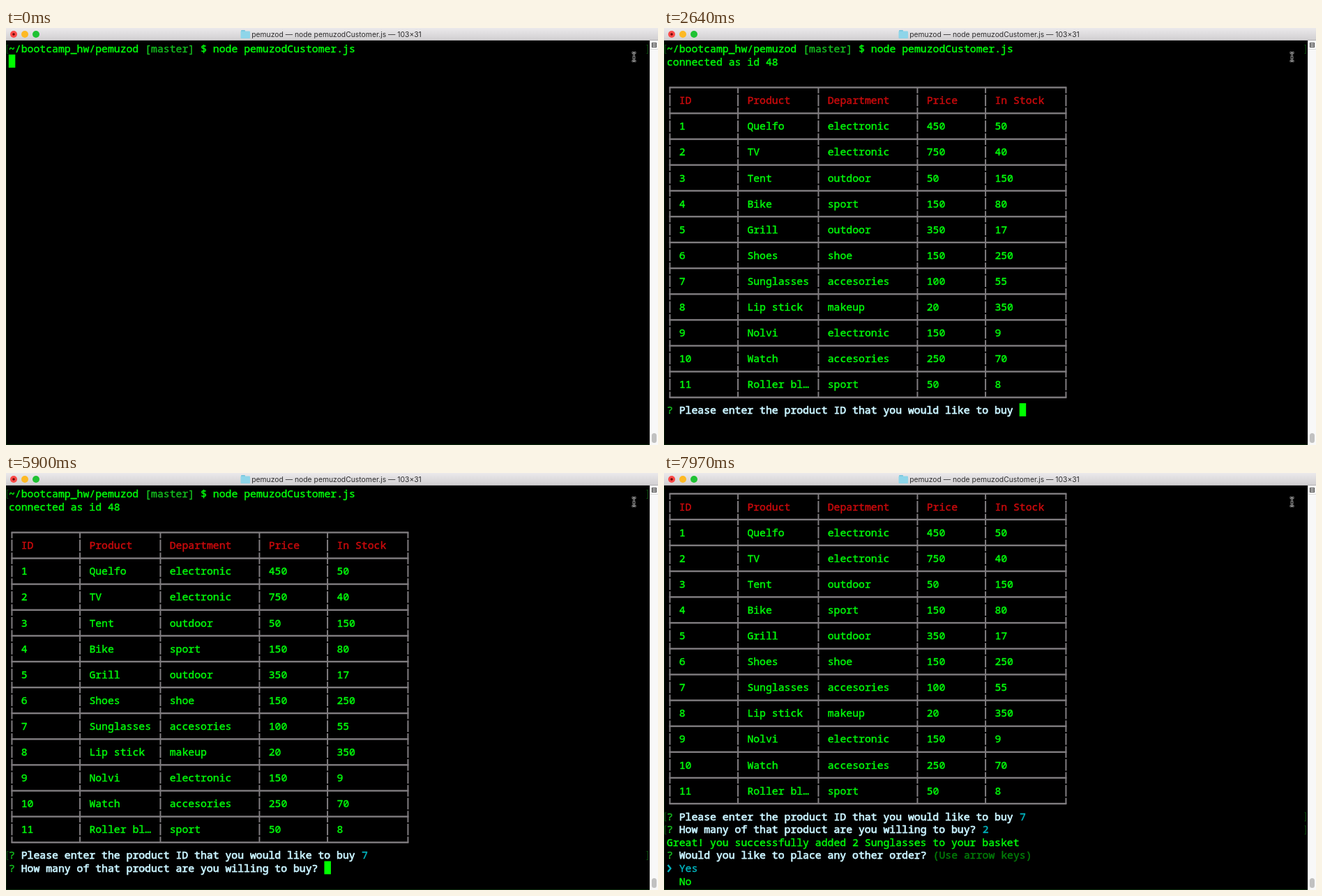
Recreate the animation shown at these times as an HTML page with a canvas. Size 935x599 px, loop 8 s.

```html
<!DOCTYPE html>
<html lang="en">
<head>
<meta charset="utf-8">
<title>Terminal shop</title>
<style>
html, body { margin: 0; width: 100%; height: 100%; overflow: hidden; background: #000; }
canvas { display: block; width: 100vw; height: 100vh; }
</style>
</head>
<body>
<canvas id="stage" width="935" height="599"></canvas>
<script>
const ctx = document.getElementById('stage').getContext('2d');
const W = 935, H = 599, LOOP = 8000;
const CELL = 8.875, PITCH = 18.55, LEFT = 4, FIRST = 30;
const MONO = '14.79px "Noto Sans Mono", "DejaVu Sans Mono", monospace';
const MEDIUM = .45, STRONG = .75;

const GREEN = '#00fb0a', MID = '#14b91e', DARK = '#007d08';
const RED = '#cb0a0c', WHITE = '#c9f3ff', CYAN = '#00b5c0', GREY = '#807d80';

// Moments at which the session changes, in ms
const AT = { table: 500, ask: 770, typeId: 4700, askCount: 5400, typeCount: 6900, done: 7220 };

const EDGES = [0, 11, 24, 40, 51, 64];
const ROWS = [
  'ID|Product|Department|Price|In Stock',
  '1|Quelfo|electronic|450|50',
  '2|TV|electronic|750|40',
  '3|Tent|outdoor|50|150',
  '4|Bike|sport|150|80',
  '5|Grill|outdoor|350|17',
  '6|Shoes|shoe|150|250',
  '7|Sunglasses|accesories|100|55',
  '8|Lip stick|makeup|20|350',
  '9|Nolvi|electronic|150|9',
  '10|Watch|accesories|250|70',
  '11|Roller bl…|sport|50|8'
].map(row => row.split('|'));
const TABLE_LINE = 3;

const colX = col => LEFT + col * CELL;
const midY = line => FIRST + line * PITCH;

function rect(x, y, w, h, color) {
  ctx.fillStyle = color;
  ctx.fillRect(x, y, w, h);
}

function disc(x, y, r, color) {
  ctx.fillStyle = color;
  ctx.beginPath();
  ctx.arc(x, y, r, 0, Math.PI * 2);
  ctx.fill();
}

function pill(x, y, w, h, r, color) {
  ctx.fillStyle = color;
  ctx.beginPath();
  ctx.roundRect(x, y, w, h, r);
  ctx.fill();
}

function stroke(points, color, width) {
  ctx.strokeStyle = color;
  ctx.lineWidth = width;
  ctx.beginPath();
  points.forEach(([x, y], i) => i ? ctx.lineTo(x, y) : ctx.moveTo(x, y));
  ctx.stroke();
}

// A fine outline gives the glyphs their weight
function print(line, col, text, color, weight = MEDIUM) {
  const x = colX(col), y = midY(line) + 5;
  ctx.font = MONO;
  ctx.textAlign = 'left';
  ctx.lineJoin = 'round';
  ctx.lineWidth = weight;
  ctx.fillStyle = ctx.strokeStyle = color;
  ctx.fillText(text, x, y);
  ctx.strokeText(text, x, y);
}

function caret(line, col) {
  rect(colX(col) - .2, midY(line) - 10.4, 9.5, 18.8, '#00ff00');
}

// Small brackets at both window edges beside a command line
function marks(line) {
  const y = Math.round(midY(line)) - 6;
  for (const [x, dir] of [[1.5, 1], [920.5, -1]]) {
    stroke([[x + 2 * dir, y + .5], [x, y + .5], [x, y + 12.5], [x + 2 * dir, y + 12.5]], '#064f0a', 1);
  }
}

function question(line, text) {
  print(line, 0, '?', MID);
  print(line, 2, text, WHITE, STRONG);
}

function table() {
  const last = ROWS.length * 2;
  const x0 = colX(.5), x1 = colX(EDGES[5] + .5);
  for (let i = 0; i <= last; i++) {
    const y = midY(TABLE_LINE + i) - .2;
    if (i % 2 === 0) rect(x0 - 1, y - 1.2, x1 - x0 + 2, 2.4, GREY);
    const top = i === 0 ? y : y - 8.3;
    const bottom = i === last ? y : y + 8.3;
    for (const edge of EDGES) {
      rect(colX(edge + .5) - 1, top, 2, bottom - top, GREY);
    }
  }
  ROWS.forEach((row, r) => row.forEach((cell, c) => {
    print(TABLE_LINE + 1 + r * 2, EDGES[c] + 2, cell, r ? GREEN : RED);
  }));
}

function session(t) {
  const blink = (t - 640 + LOOP) % 1000 < 500;

  marks(0);
  print(0, 0, '~/bootcamp_hw/pemuzod', GREEN);
  print(0, 22, '[master]', MID);
  print(0, 31, '$ node pemuzodCustomer.js', GREEN);
  if (t < AT.table) {
    if (blink) caret(1, 0);
    return;
  }

  print(1, 0, 'connected as id 48', GREEN);
  table();
  if (t < AT.ask) {
    if (blink) caret(28, 0);
    return;
  }

  question(28, 'Please enter the product ID that you would like to buy');
  if (t < AT.askCount) {
    const typed = t >= AT.typeId;
    if (typed) print(28, 57, '7', GREEN);
    if (blink) caret(28, typed ? 58 : 57);
    return;
  }

  marks(28);
  print(28, 57, '7', CYAN);
  question(29, 'How many of that product are you willing to buy?');
  if (t < AT.done) {
    const typed = t >= AT.typeCount;
    if (typed) print(29, 51, '2', GREEN);
    if (blink) caret(29, typed ? 52 : 51);
    return;
  }

  marks(29);
  print(29, 51, '2', CYAN);
  print(30, 0, 'Great! you successfully added 2 Sunglasses to your basket', GREEN);
  question(31, 'Would you like to place any other order?');
  print(31, 43, '(Use arrow keys)', DARK);
  const y = midY(32);
  stroke([[5.5, y - 5], [9.5, y], [5.5, y + 5]], CYAN, 2.4);
  print(32, 2, 'Yes', CYAN);
  print(33, 2, 'No', GREEN);
}

function titleBar() {
  const shade = ctx.createLinearGradient(0, 0, 0, 18);
  shade.addColorStop(0, '#ebe9eb');
  shade.addColorStop(1, '#d0ced0');
  rect(0, 0, W, 18, shade);
  rect(0, 17, W, 1, '#b4b2b4');

  disc(11, 9, 5, '#fb4a48');
  disc(11, 9, 1.8, '#6d0705');
  disc(27, 9, 5, '#fdb924');
  disc(43, 9, 5, '#1fc233');

  pill(337, 3, 6, 4, 1, '#74c4dc');
  pill(336.5, 4.5, 13.5, 10.5, 1, '#8ed5e9');

  ctx.font = '10.35px Inter, "Liberation Sans", sans-serif';
  ctx.textAlign = 'center';
  ctx.fillStyle = '#2e2d2e';
  ctx.fillText('pemuzod — node pemuzodCustomer.js — 103×31', 474, 13);
}

function scrollBar() {
  rect(923, 18, 12, H - 18, '#f8f8f8');
  rect(923, 18, 1, H - 18, '#e2e2e2');
  rect(923, 30, 12, 1, '#dcdcdc');
  rect(926, 21, 7, 7, '#4c4c4c');
  for (const y of [22, 24, 26]) rect(927, y, 5, 1, '#e4e4e4');
  pill(926, 582, 7, 14, 3.5, '#c1c1c1');
}

function pointer() {
  const shape = [
    [[897.5, 35.5], [899.5, 35.5], [900.5, 36.5], [901.5, 35.5], [903.5, 35.5]],
    [[900.5, 36.5], [900.5, 46.5]],
    [[897.5, 47.5], [899.5, 47.5], [900.5, 46.5], [901.5, 47.5], [903.5, 47.5]],
    [[898.5, 42.5], [902.5, 42.5]]
  ];
  shape.forEach(part => stroke(part, '#b8b8b8', 2.6));
  shape.forEach(part => stroke(part, '#161616', 1));
}

function draw(t) {
  rect(0, 0, W, H, '#000');
  rect(0, 18, 1, H - 18, '#061c07');
  rect(0, H - 1, W, 1, '#0a2a0c');

  ctx.save();
  ctx.beginPath();
  ctx.rect(0, 19, 923, H - 19);
  ctx.clip();
  if (t >= AT.done) ctx.translate(0, -3 * PITCH);
  session(t);
  ctx.restore();

  titleBar();
  scrollBar();
  pointer();
}

const start = performance.now();
function tick() {
  draw((performance.now() - start) % LOOP);
  requestAnimationFrame(tick);
}
tick();
</script>
</body>
</html>
```
